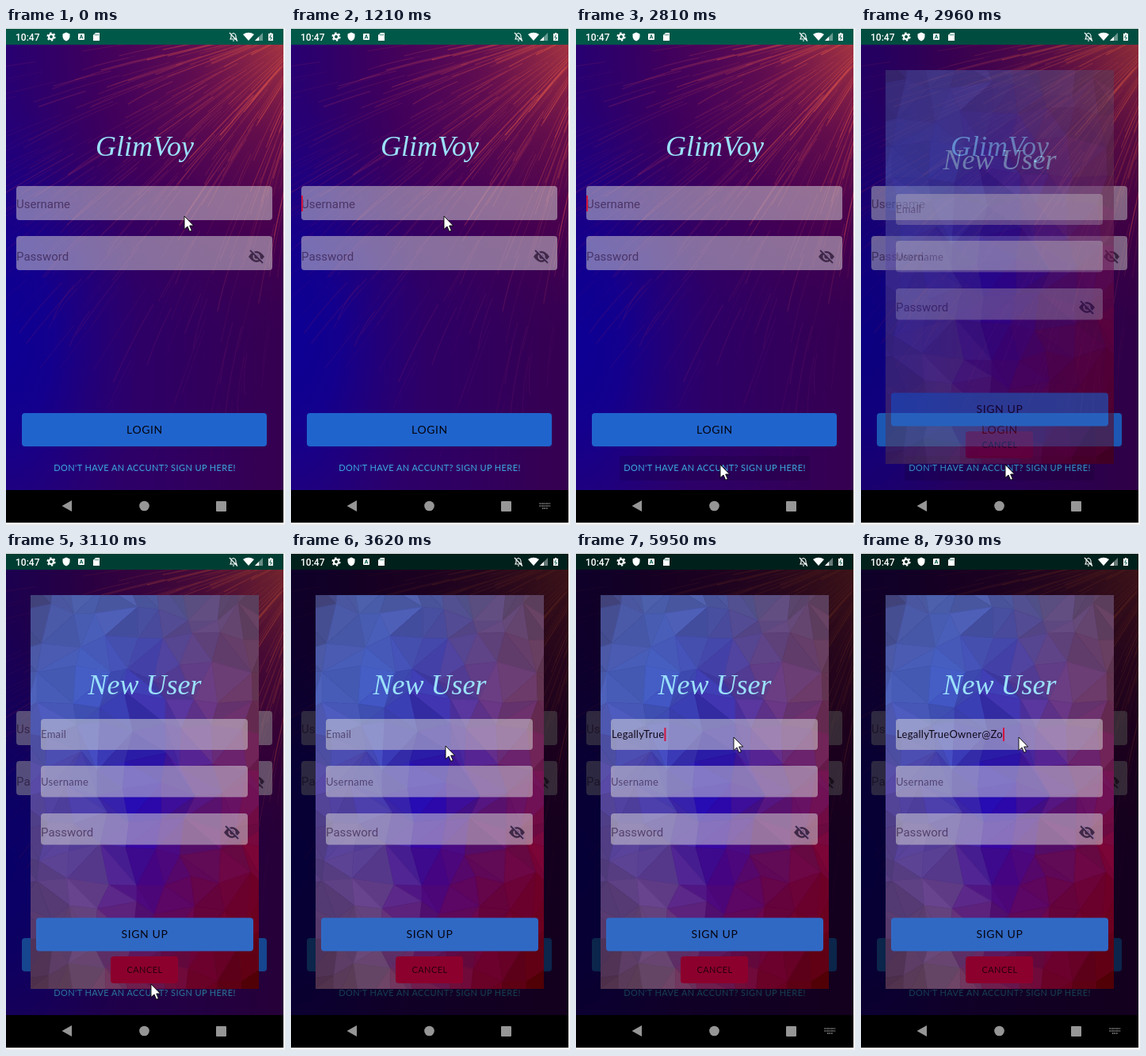
An HTML page for the animation above (8 s loop, 352 by 626 pixels).

```html
<!DOCTYPE html>
<html lang="en">
<head>
<meta charset="utf-8">
<title>Sign-up screen</title>
<style>
  html, body { margin: 0; width: 100%; height: 100%; overflow: hidden; background: #f2f2f2; }
  svg { display: block; width: 100vw; height: 100vh; }
  text { font-family: Lato, sans-serif; white-space: pre; }
  .title { font: italic 36px "Liberation Serif", cursive; fill: #9be1fb; text-anchor: middle; }
  .plain { font: 15px Roboto, sans-serif; fill: #21052f; fill-opacity: .55; }
  .hint { font-size: 13px; letter-spacing: .3px; fill: #21052f; fill-opacity: .55; }
  .typed { font-size: 13px; letter-spacing: .3px; fill: #12081c; }
  .button { font-size: 14px; letter-spacing: .6px; fill: #050510; text-anchor: middle; }
  .small { font-size: 11px; letter-spacing: .4px; text-anchor: middle; }
  .field { fill: #d7d7d7; fill-opacity: .51; }
  .caret { fill: #d3163f; }
</style>
</head>
<body>
<svg viewBox="0 0 352 626" preserveAspectRatio="none">
  <defs>
    <linearGradient id="base">
      <stop offset="0" stop-color="#260074"/>
      <stop offset=".5" stop-color="#2e0066"/>
      <stop offset="1" stop-color="#360050"/>
    </linearGradient>
    <radialGradient id="blue" gradientUnits="userSpaceOnUse" cx="0" cy="0" r="1" gradientTransform="translate(0 390) scale(170 320)">
      <stop offset="0" stop-color="#0c0094"/>
      <stop offset=".35" stop-color="#0f0092" stop-opacity=".85"/>
      <stop offset="1" stop-color="#200080" stop-opacity="0"/>
    </radialGradient>
    <radialGradient id="glow" gradientUnits="userSpaceOnUse" cx="352" cy="22" r="370">
      <stop offset="0" stop-color="#c8453c" stop-opacity=".75"/>
      <stop offset=".3" stop-color="#8c1a44" stop-opacity=".55"/>
      <stop offset=".65" stop-color="#5c0048" stop-opacity=".4"/>
      <stop offset="1" stop-color="#400050" stop-opacity="0"/>
    </radialGradient>
    <g id="eye" fill="#3f2848">
      <path fill-rule="evenodd" d="M-10 0Q0-14 10 0Q0 14-10 0Z M-4.6 0a4.6 4.6 0 1 0 9.2 0a4.6 4.6 0 1 0-9.2 0Z M-2.7 0a2.7 2.7 0 1 0 5.4 0a2.7 2.7 0 1 0-5.4 0Z"/>
      <path d="M-6.5-8.5L9.5 7.5" stroke="#8d709f" stroke-width="1.6"/>
      <path d="M-8-8L8 8" stroke="#3f2848" stroke-width="1.8"/>
    </g>
  </defs>

  <g id="page">
    <rect y="21" width="350" height="561" fill="url(#base)"/>
    <rect y="21" width="350" height="561" fill="url(#blue)"/>
    <rect y="21" width="350" height="561" fill="url(#glow)"/>
    <g id="streaks" fill="none" stroke-linecap="round"></g>
    <rect y="1" width="350" height="20" fill="#005849"/>

    <text class="title" x="175" y="161">GlimVoy</text>
    <rect class="field" x="13" y="199" width="323" height="43" rx="4"/>
    <text class="plain" x="13" y="227">Username</text>
    <rect class="field" x="13" y="262" width="323" height="43" rx="4"/>
    <text class="plain" x="13" y="293">Password</text>
    <use href="#eye" x="316" y="288"/>
    <rect id="pageCaret" class="caret" x="13" y="211" width="2" height="20"/>

    <rect x="20" y="485" width="309" height="42" rx="4" fill="#1f64cd"/>
    <text class="button" x="175" y="511">LOGIN</text>
    <rect id="press" x="55" y="539" width="240" height="31" rx="3" fill="#12002c"/>
    <text class="small" x="175" y="558" fill="#3caae1">DON'T HAVE AN ACCUNT? SIGN UP HERE!</text>
  </g>

  <rect id="dim" y="1" width="350" height="581"/>

  <g fill="#fff">
    <text x="12" y="16" style="font:500 12px Roboto,sans-serif">10:47</text>
    <circle cx="57" cy="11" r="3" fill="none" stroke="#fff" stroke-width="2.2"/>
    <circle cx="57" cy="11" r="4.8" fill="none" stroke="#fff" stroke-width="1.6" stroke-dasharray="2.5 2.53"/>
    <path d="M76 5.5L80.5 7.5V11Q80 15 76 16.5Q72 15 71.5 11V7.5Z"/>
    <rect x="91" y="7" width="8" height="8" rx="1"/>
    <path d="M93 13.5L95 8.5L97 13.5M94 12H96" fill="none" stroke="#005849"/>
    <path d="M113 6H118V16H110V9Z"/>
    <path d="M112.5 7.5V9.5M114.5 7.5V9.5M116.3 7.5V9.5" stroke="#005849" stroke-width=".8"/>
    <path d="M283 14H291L290 12V9.5Q289.5 7 287 6.5Q284.5 7 284 9.5V12ZM286 16H288M282 6L292 16.5" fill="none" stroke="#fff" stroke-width="1.1"/>
    <path d="M299 8Q306 3.5 313 8L306 16Z"/>
    <path d="M324 6V16H314Z" fill-opacity=".4"/>
    <path d="M319 11V16H314Z"/>
    <path d="M331 7H333V6H335V7H337V16H331Z"/>
    <path d="M334.5 8.5L332.6 12H335.4L333.6 15" fill="none" stroke="#005849" stroke-width=".9"/>
  </g>

  <g id="dialog">
    <clipPath id="card"><rect x="31" y="53" width="288" height="496"/></clipPath>
    <g id="mesh" clip-path="url(#card)" stroke-width=".6"></g>
    <text class="title" x="175" y="178">New User</text>
    <rect class="field" x="44" y="209" width="261" height="39" rx="4"/>
    <text id="emailHint" class="hint" x="44" y="233">Email</text>
    <text id="email" class="typed" x="45" y="233"></text>
    <rect id="emailCaret" class="caret" y="220" width="2" height="17"/>
    <rect class="field" x="44" y="268" width="261" height="39.500" rx="4"/>
    <text class="hint" x="44" y="293">Username</text>
    <rect class="field" x="44" y="328" width="261" height="39.500" rx="4"/>
    <text class="plain" x="44" y="357">Password</text>
    <use href="#eye" x="285" y="352"/>
    <rect x="38" y="459.500" width="274" height="42" rx="4" fill="#3069c4"/>
    <text class="button" x="175" y="485">SIGN UP</text>
    <rect x="132" y="508" width="85" height="34" rx="4" fill="#8c002d"/>
    <text class="small" x="175" y="529" fill="#26000f">CANCEL</text>
  </g>

  <rect y="582" width="350" height="41"/>
  <g fill="#969696">
    <path d="M83 595V609L70.500 602Z"/>
    <circle cx="174.500" cy="602" r="6.300"/>
    <rect x="265" y="596" width="13" height="13" rx="1"/>
    <path id="keyboard" d="M313.500 599H327M313.500 602H327M317 605H323.500" stroke="#969696" stroke-width="1.500" stroke-dasharray="1.500 1"/>
  </g>
  <path d="M0 0H352V626H0V623H350V1H0Z" fill="#f2f2f2"/>
  <path id="cursor" d="M0 0V16.500L4 13L6.700 19.300L9.400 18.200L6.700 12H11.700Z" fill="#fff" stroke="#000" stroke-width=".9"/>
</svg>

<script>
const el = id => document.getElementById(id);
const lerp = (a, b, k) => a + (b - a) * k;

let seed = 11;
function random(low = 0, high = 1) {
  seed = (seed * 16807) % 2147483647;
  return lerp(low, high, seed / 2147483647);
}

function addPath(parent, attributes) {
  const path = document.createElementNS('http://www.w3.org/2000/svg', 'path');
  for (const name in attributes) path.setAttribute(name, attributes[name]);
  parent.append(path);
}

// Light trails fanning out from beyond the top right corner, fading with distance.
function drawStreaks() {
  const origin = { x: 400, y: -10 };
  const point = (angle, radius) =>
    `${(origin.x - Math.cos(angle) * radius).toFixed(1)} ${(origin.y + Math.sin(angle) * radius).toFixed(1)}`;
  for (let i = 0; i < 300; i++) {
    const angle = random(0.1, 1.4);
    const start = 40 + 460 * random() ** 1.2;
    const length = random(40, 130);
    const far = Math.min(1, start / 400);
    const color = [lerp(235, 115, far), lerp(90, 25, far), lerp(65, 105, far)].map(Math.round);
    addPath(el('streaks'), {
      d: `M${point(angle, start)}Q${point(angle, start + length / 2)} ${point(angle + random(0, 0.02), start + length)}`,
      stroke: `rgb(${color})`,
      'stroke-width': random(0.5, 1.5).toFixed(2),
      opacity: (lerp(0.6, 0.28, far) * random(0.4, 1)).toFixed(2)
    });
  }
}

// Low-poly card: jittered triangles coloured from a coarse grid of tones.
function drawMesh() {
  const tones = [
    '42447d 4e64b4 4b559b 5f5082 5f415f',
    '4b5fb4 415ac3 3c37ac 693c87 693755',
    '55469b 463caf 1e05af 551987 6e0f4b',
    '553c78 64418c 480582 69054b 760028',
    '4b2d46 6b4a68 691946 6e0023 500005'
  ].map(row => row.split(' ').map(hex => [0, 2, 4].map(i => parseInt(hex.slice(i, i + 2), 16))));

  function toneAt(x, y) {
    const u = Math.min(3.999, Math.max(0, (x - 31) / 72));
    const v = Math.min(3.999, Math.max(0, (y - 53) / 124));
    const c = Math.floor(u), r = Math.floor(v);
    return [0, 1, 2].map(i => lerp(
      lerp(tones[r][c][i], tones[r][c + 1][i], u - c),
      lerp(tones[r + 1][c][i], tones[r + 1][c + 1][i], u - c), v - r));
  }

  function triangle(...points) {
    const mean = axis => points.reduce((sum, p) => sum + p[axis], 0) / 3;
    const shade = random(0.93, 1.07);
    const color = `rgb(${toneAt(mean(0), mean(1)).map(v => Math.round(v * shade))})`;
    addPath(el('mesh'), { d: `M${points.join('L')}Z`, fill: color, stroke: color });
  }

  const grid = Array.from({ length: 15 }, (_, row) => Array.from({ length: 10 }, (_, col) =>
    [Math.round(13 + col * 36 + random(-11, 11)), Math.round(34 + row * 38 + random(-13, 13))]));
  for (let r = 0; r < 14; r++) for (let c = 0; c < 9; c++) {
    const a = grid[r][c], b = grid[r][c + 1], d = grid[r + 1][c], e = grid[r + 1][c + 1];
    if (random() < 0.5) { triangle(a, b, d); triangle(b, e, d); }
    else { triangle(a, b, e); triangle(a, e, d); }
  }
}

// Each track holds [time, value...] steps; a value stays until the next step.
const pointer = [
  [0, 225, 237], [120, 222, 234], [250, 214, 228], [380, 207, 223], [500, 203, 221], [630, 202, 221],
  [910, 198, 228], [1040, 194, 236], [1210, 193, 237], [1450, 191, 285], [1590, 187, 380],
  [1710, 181, 470], [1840, 178, 525], [1960, 181, 545], [2110, 182, 550],
  [3110, 183, 543], [3230, 184, 505], [3360, 188, 400], [3490, 193, 290], [3620, 195, 243], [3740, 199, 232]
];
const dimming = [[0, 0], [2960, 0.13], [3110, 0.3], [3230, 0.42], [3360, 0.53], [3490, 0.6], [3620, 0.63]];
const address = 'LegallyTrueOwner@Zo';
const typing = [
  [0, ''], [4720, 'Lwgal'], [5000, 'L'],
  ...[[5120, 5], [5390, 7], [5670, 9], [5950, 11], [6250, 12], [6430, 13], [6620, 14],
      [6800, 15], [6990, 16], [7260, 17], [7660, 18], [7930, 19]].map(([t, n]) => [t, address.slice(0, n)])
];
const held = (track, t) => track.findLast(step => step[0] <= t).slice(1);
const within = (t, from, to) => t >= from && t < to;
const show = (id, visible) => el(id).setAttribute('visibility', visible ? 'visible' : 'hidden');

function render(t) {
  const [x, y] = held(pointer, t);
  el('cursor').setAttribute('transform', `translate(${x} ${y})`);
  el('dim').setAttribute('opacity', held(dimming, t)[0]);
  el('dialog').setAttribute('opacity', t < 2960 ? 0 : t < 3110 ? 0.55 : 1);
  el('press').setAttribute('opacity', within(t, 2390, 3110) ? (t < 2540 ? 0.1 : 0.2) : 0);

  const [text] = held(typing, t);
  el('email').textContent = text;
  el('emailCaret').setAttribute('x', 44 + (text ? el('email').getComputedTextLength() + 1 : 0));
  show('emailHint', !text);
  show('emailCaret', within(t, 3860, 4440) || t >= 4720);
  show('pageCaret', within(t, 1040, 1590) || within(t, 2110, 2960));
  show('keyboard', within(t, 1210, 2810) || t >= 4010);
}

drawStreaks();
drawMesh();
function frame() {
  render(performance.now() % 8000);
  requestAnimationFrame(frame);
}
frame();
</script>
</body>
</html>
```
